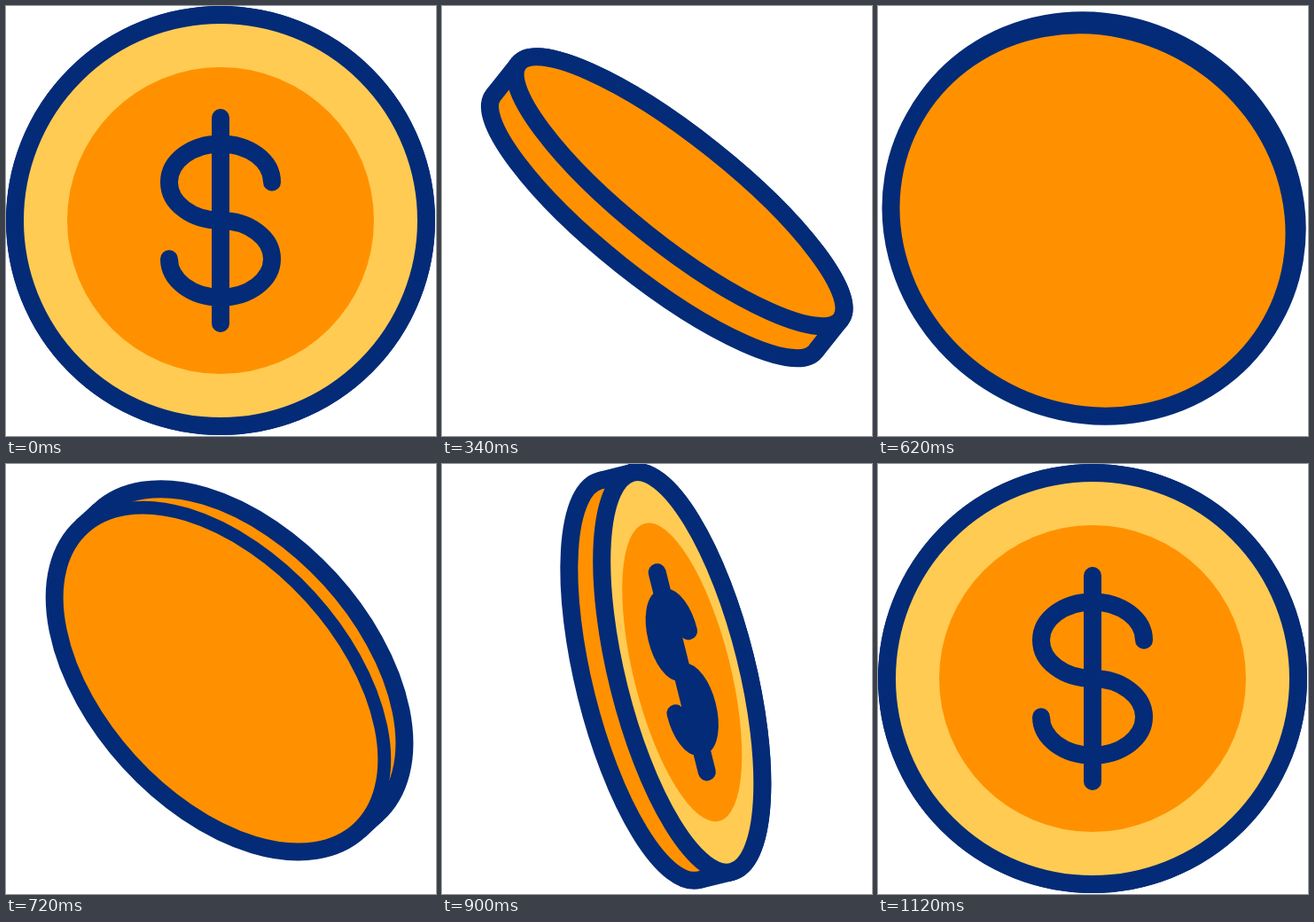
An HTML page with a canvas for the animation above (1.4 s loop, 485 by 485 pixels).

```html
<!DOCTYPE html>
<html lang="en">
<head>
<meta charset="utf-8">
<title>Spinning coin</title>
<style>
  html, body { margin: 0; width: 100%; height: 100%; overflow: hidden; background: #fff; }
  canvas { display: block; width: 485px; height: 485px; }
</style>
</head>
<body>
<canvas id="stage" width="485" height="485"></canvas>
<script>
const ctx = document.getElementById('stage').getContext('2d');

const NAVY = '#032b77', ORANGE = '#ff9100', GOLD = '#ffcb53';
const LOOP = 1400, TURN = 1120, STEP = 20;
const CENTER = 242, RADIUS = 232, DISC = 173, LINE = 20;
const RAD = Math.PI / 180;

// time (ms), spin (deg), lean (deg), offset from front to back (px),
// pivot (0 = front face rests on the centre, 1 = back face does)
const KEYS = [
  [0, 0, 0, 0, 0],
  [80, 27, 4.5, 6.5, 0],
  [160, 53.5, 17, 18.7, 0],
  [280, 88.5, 41, 41, 0],
  [340, 105, 51.5, 46, 0.09],
  [470, 149, 65, 23, 0.6],
  [560, 180, 61.5, 0, 1],
  [620, 201.5, 57.5, -6, 1],
  [820, 264, 26.3, -45.5, 1],
  [900, 288.4, 14, -38, 0.78],
  [1010, 325, 4, -11, 0.39],
  [TURN, 360, 0, 0, 0]
];
const SPIN = 1, LEAN = 2, DEPTH = 3, PIVOT = 4;

const clamp = (v, lo, hi) => Math.min(hi, Math.max(lo, v));

function slope(i, col) {
  const a = KEYS[Math.max(0, i - 1)];
  const b = KEYS[Math.min(KEYS.length - 1, i + 1)];
  return (b[col] - a[col]) / (b[0] - a[0]);
}

// Cubic Hermite curve through one column of the keys.
function sample(t, col) {
  let i = 0;
  while (i < KEYS.length - 2 && t >= KEYS[i + 1][0]) i++;
  const a = KEYS[i], b = KEYS[i + 1];
  const span = b[0] - a[0], u = (t - a[0]) / span, u2 = u * u, u3 = u2 * u;
  return (2 * u3 - 3 * u2 + 1) * a[col] + (3 * u2 - 2 * u3) * b[col]
    + span * ((u3 - 2 * u2 + u) * slope(i, col) + (u3 - u2) * slope(i + 1, col));
}

function disc(x, rx, ry, fill, lineWidth) {
  ctx.beginPath();
  ctx.ellipse(x, 0, Math.max(0, rx), ry, 0, 0, Math.PI * 2);
  ctx.fillStyle = fill;
  ctx.fill();
  if (lineWidth) {
    ctx.strokeStyle = NAVY;
    ctx.lineWidth = lineWidth;
    ctx.stroke();
  }
}

function wall(x1, x2, half, color) {
  ctx.fillStyle = color;
  ctx.fillRect(Math.min(x1, x2), -half, Math.abs(x2 - x1), half * 2);
}

// The path is squeezed by the spin, the pen keeps its width.
function dollar(x, squeeze) {
  ctx.save();
  ctx.translate(x, 0);
  ctx.scale(squeeze, 1);
  ctx.beginPath();
  ctx.moveTo(0, -116);
  ctx.lineTo(0, 116);
  ctx.moveTo(58, -43.3);
  ctx.ellipse(0, -43.3, 58, 43.3, 0, 0, Math.PI / 2, true);
  ctx.ellipse(0, 43.3, 58, 43.3, 0, -Math.PI / 2, Math.PI);
  ctx.restore();
  ctx.strokeStyle = NAVY;
  ctx.lineWidth = LINE;
  ctx.lineCap = ctx.lineJoin = 'round';
  ctx.stroke();
}

function drawCoin(t) {
  const cos = Math.cos(sample(t, SPIN) * RAD);
  const squeeze = Math.max(0.001, Math.abs(cos));
  const showFront = cos > 0;

  const depth = sample(t, DEPTH);
  const pivot = clamp(sample(t, PIVOT), 0, 1);
  const front = -depth * pivot;
  const back = depth * (1 - pivot);
  const near = showFront ? front : back;
  const far = showFront ? back : front;

  // The rim of the near face thins out while little of the side shows.
  const rim = clamp(8 + (Math.abs(depth) - 18.7) * 0.8, 8, LINE);
  const inset = (rim - LINE) / 2;
  const rx = RADIUS * squeeze;

  ctx.setTransform(1, 0, 0, 1, 0, 0);
  ctx.fillStyle = '#fff';
  ctx.fillRect(0, 0, 485, 485);
  ctx.translate(CENTER, CENTER);
  ctx.rotate(-sample(t, LEAN) * RAD);

  disc(near, rx, RADIUS, NAVY, LINE);
  wall(near, far, RADIUS + LINE / 2, NAVY);
  disc(far, rx, RADIUS, ORANGE, LINE);
  wall(near, far, RADIUS - LINE / 2, ORANGE);
  disc(near, rx + inset, RADIUS + inset, showFront ? GOLD : ORANGE, rim);

  if (showFront) {
    disc(near, DISC * squeeze, DISC, ORANGE);
    dollar(near, squeeze);
  }
}

const start = performance.now();

function tick() {
  const t = (performance.now() - start) % LOOP;
  drawCoin(Math.min(TURN, Math.floor(t / STEP) * STEP));
  requestAnimationFrame(tick);
}
tick();
</script>
</body>
</html>
```
